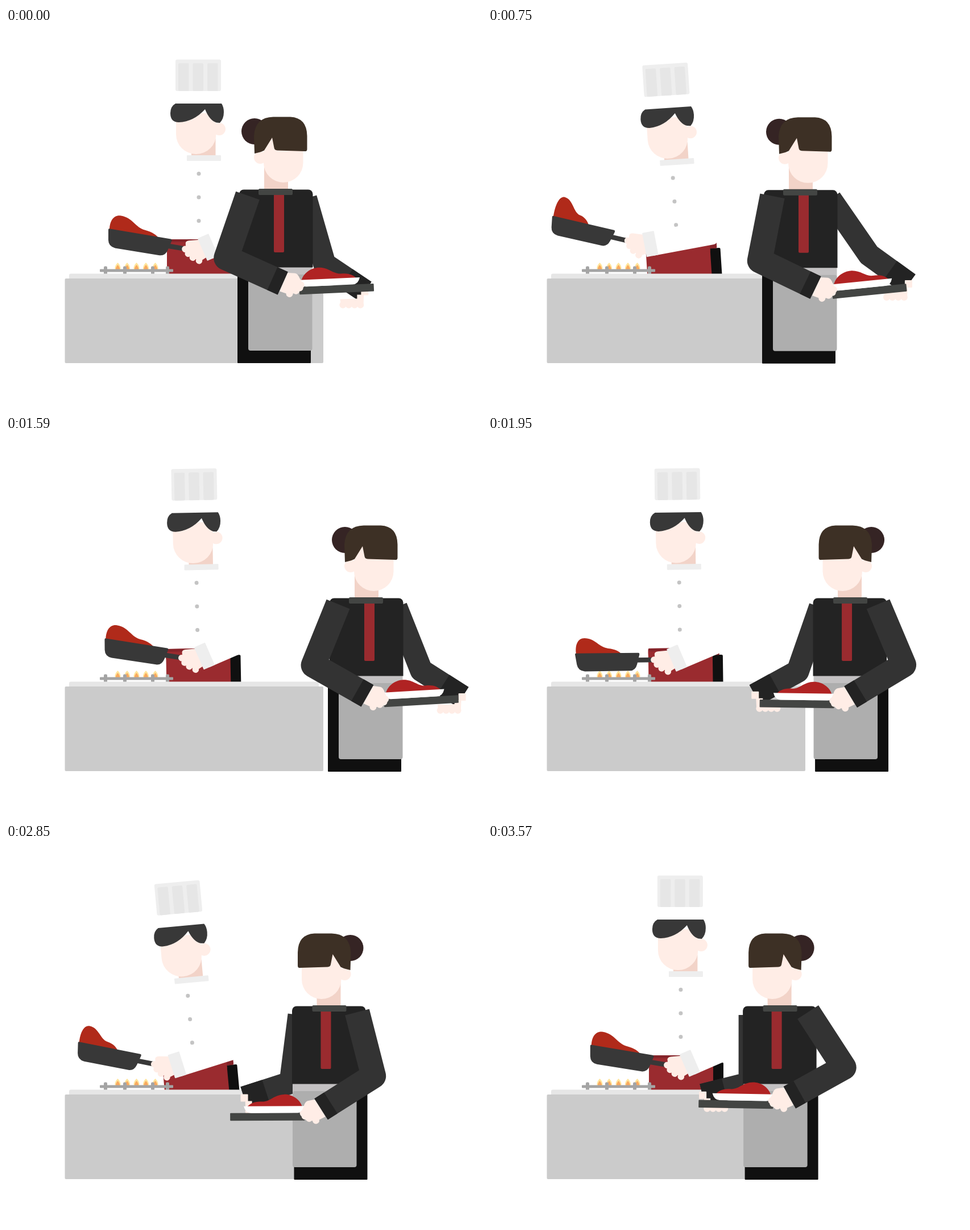
An HTML page with a canvas that plays this animation: 837 px wide and 669 px high, repeating every 3600 ms.

```html
<!DOCTYPE html>
<html lang="en">
<head>
<meta charset="utf-8">
<title>Kitchen</title>
<style>
  html, body { margin: 0; width: 837px; height: 669px; overflow: hidden; background: #fff; }
  canvas { display: block; }
</style>
</head>
<body>
<canvas id="stage" width="837" height="669"></canvas>
<script>
const ctx = document.getElementById('stage').getContext('2d');
const LOOP = 3600, STEP = 30, COOK = 1800, TURN = 1800;
const SKIN = '#ffede6', SHADE = '#f2d3c8', RED = '#9a2b2f', BLACK = '#101010',
      COAT = '#232323', SLEEVE = '#333333', IRON = '#383838';

const rad = deg => deg * Math.PI / 180;
const smooth = u => (1 - Math.cos(Math.PI * u)) / 2;

// Eases through a few [time, value] turning points
function ease(t, ...points) {
  const i = Math.max(1, points.findIndex(p => p[0] > t));
  const [t0, v0] = points[i - 1], [t1, v1] = points[i];
  return v0 + (v1 - v0) * smooth((t - t0) / (t1 - t0));
}

// Goes 0 to 1 with the given rise until the peak, then eases back to 0
const swing = (p, peak, rise) => p < peak ? rise(p / peak) : 1 - smooth((p - peak) / (COOK - peak));

function box(color, x0, y0, x1, y1, r = 0) {
  ctx.fillStyle = color;
  ctx.beginPath();
  ctx.roundRect(x0, y0, x1 - x0, y1 - y0, r);
  ctx.fill();
}
function dot(color, x, y, r) {
  ctx.fillStyle = color;
  ctx.beginPath();
  ctx.arc(x, y, r, 0, 7);
  ctx.fill();
}
function shape(color, d) {
  ctx.fillStyle = color;
  ctx.fill(new Path2D(d));
}
function at(x, y, deg, draw) {
  ctx.save();
  ctx.translate(x, y);
  ctx.rotate(rad(deg));
  draw();
  ctx.restore();
}
function line(color, width, ...pts) {
  ctx.strokeStyle = color;
  ctx.lineWidth = width;
  ctx.lineJoin = 'round';
  ctx.beginPath();
  pts.forEach(p => ctx.lineTo(p[0], p[1]));
  ctx.stroke();
}

function cookBody(lean) {
  at(446, 471, -lean, () => {
    ctx.translate(-446, -471);
    box(BLACK, 380, 384.5, 414, 470, 2);
    box(RED, 283, 372, 396, 470, 2);
    box('#85242a', 283, 372, 408, 385, 2);
    box(RED, 283, 377, 396, 390);
    box('#eeeeee', 298, 55.5, 378, 111, 3);
    for (let i = 0; i < 3; i++) box('#e6e6e6', 303 + 25.5 * i, 62, 321.5 + 25.5 * i, 111, 2);
    box(SHADE, 326, 195, 368.5, 226);
    box(SKIN, 299, 150, 369.5, 222, [0, 0, 35, 35]);
    dot(SKIN, 375, 178, 11);
    shape(IRON, 'M298 133Q289 138 289 150Q289 166 304 166Q330 165 350 143Q358 163 370 166.5L376 167Q383 160 383 148Q383 139 379 133Z');
    box('#eeeeee', 318, 224, 378, 234, 1);
    for (let i = 0; i < 3; i++) dot('#c4c4c4', 339, 256.5 + 41.5 * i, 3.5);
  });
}

function stove() {
  for (let i = 0; i < 5; i++) {
    at(196.5 + 16.5 * i, 427, 0, () => {
      shape('#ffe59c', 'M0 -14Q5 -9 5 -4Q5 1 0 1Q-5 1 -5 -4Q-5 -9 0 -14Z');
      shape('#f9a95f', 'M0 -10Q3.5 -6 3.5 -3Q3 1 0 1Q-3 1 -3.5 -3Q-3.5 -6 0 -10Z');
    });
  }
  box('#a4a4a4', 165, 424.5, 294, 429.5, 1);
  for (const x of [172, 206, 255, 281]) box('#a4a4a4', x, 419.5, x + 6, 434, 2);
  box('#e6e6e6', 111, 432.5, 550, 445, 3);
  box('#cbcbcb', 103.5, 441, 558, 590, 2);
}

function pan(foodHeight, foodWidth) {
  ctx.translate(-142, -13);
  ctx.save();
  ctx.translate(2, 2);
  ctx.scale(foodWidth, foodHeight + 2);
  shape('#b02a1a', 'M0 0C-.03 -.6 .04 -1 .18 -1C.42 -1 .5 -.42 .7 -.36C.86 -.32 .95 -.15 1 0L1 .2L0 .2Z');
  ctx.restore();
  box(IRON, 104, 8.5, 144, 17, 3);
  shape(IRON, 'M1 0L111 0Q114 0 113 4L109 20Q106 31.5 96 31.5L17 32Q5 31 3 20L0 2Q0 0 1 0Z');
}

function cookArm(p) {
  const pull = swing(p, 705, u => Math.sin(u * Math.PI / 2)), lift = pull ** 3;
  const flick = -14.2 * Math.sin(p * Math.PI / 360) * Math.exp(-p / 521);
  at(355 - 70 * pull, 386 + 18 * pull - 24 * lift, 13 * lift - 23.5, () => {
    at(-35.2, -11.4, 33.1 - 8.5 * lift + flick, () => pan(26 + 11 * lift, 88 - 24 * pull));
    box('#ffffff', 0, -21.5, 117, 21.5, [0, 0, 7, 0]);
    shape(SKIN, 'M-34 -20Q-33 -26 -26 -24L-8 -18L-8 15L-20 17L-34 6L-37 -10Z');
    for (let i = 0; i < 4; i++) dot(SKIN, -38 + 1.6 * i * i, -13 + 9.5 * i, 5.8);
    box('#eeeeee', -10.5, -21.5, 10.5, 21.5, 1);
  });
}

const reach = ([x, y], length, deg) => [x + length * Math.cos(rad(deg)), y + length * Math.sin(rad(deg))];

function arm(shoulder, elbow, wrist, width, cuff, slope) {
  line(SLEEVE, width, shoulder, elbow, wrist);
  line(COAT, width, reach(wrist, -cuff, slope), wrist);
}

function waitressBody() {
  box(BLACK, 407, 415, 536, 590, 1);
  box('#c3c1c2', 426, 418, 538.5, 440);
  box('#aeaeae', 426, 434, 538.5, 568, 4);
  dot('#352424', 437, 182, 23);
  box(SHADE, 454, 235, 496, 287);
  box(SKIN, 453, 190, 522.5, 272, [0, 0, 35, 35]);
  dot(SKIN, 447, 228, 11);
  shape('#3d3025', 'M437 221L436 190Q438 157 470 156.5L500 156.5Q529 158 529.5 190L529.5 213Q529.5 217.5 526 217L477 215.5Q472 215 471.5 211L468 193L454 215.5Q450 218 437 221Z');
  box(COAT, 410, 284.5, 539.5, 421.5, [8, 8, 0, 0]);
  box(RED, 471, 290, 489, 395, 2);
  box('#434543', 444, 283, 504, 294, 2);
}

function tray() {
  box('#434543', 0, 0, 131, 13.5, 1);
  shape('#b02323', 'M4 -10C8 -25 24 -33 36 -32.5C54 -32 60 -20 74 -20C88 -21 96 -17 102 -10Z');
  shape('#ffffff', 'M0 -12L107 -12Q104 0 94 0L12 0Q2 -1 0 -12Z');
}

function farHand() {
  box(SKIN, -7, -6, 6, 7, 1);
  shape(SKIN, 'M-14 6L-2 6L-3 26L-42 26L-44 14L-14 13Z');
  for (let i = 0; i < 4; i++) dot(SKIN, -39 + 10.3 * i, 24, 6);
}

function nearHand() {
  shape(SKIN, 'M-6 14L9 -18L22 -17Q27 -16 30 -8L36 3L28 17L10 20Z');
  for (let i = 0; i < 4; i++) dot(SKIN, 32 - 2.3 * i * i, 4 + 5 * i, 6);
}

function waitress(t) {
  const nearSwing = ease(t, [0, 19], [700, 11], [1850, 23.5], [2550, 10], [LOOP, 33]);
  const nearSlope = ease(t, [0, 24.2], [2700, 32.6], [LOOP, 29]);
  const farSwing = ease(t, [0, 16], [900, 36], [TURN, 19.5], [LOOP, 0]);
  const farSlope = ease(t, [0, 34], [900, 36], [LOOP, 14]);
  const tilt = ease(t, [0, -2.6], [950, -6.2], [2400, 0.8], [LOOP, -1]);

  const nearShoulder = [425, 295], farShoulder = [527, 300];
  const nearElbow = reach(nearShoulder, 116, 90 + nearSwing);
  const nearWrist = reach(nearElbow, 109, nearSlope);
  const farElbow = reach(farShoulder, 120, 90 - farSwing);
  const farWrist = reach(farElbow, 86, farSlope);

  ctx.save();
  ctx.translate(0, Math.min(1, t / 900));
  if (t < TURN) {
    ctx.translate(t * 0.1, 0);
  } else {
    ctx.translate(1122.5 - (t - TURN) * 0.0762, 0);
    ctx.scale(-1, 1);
  }
  arm(farShoulder, farElbow, farWrist, 40, 40, farSlope);
  at(...farWrist, 0, farHand);
  waitressBody();
  at(nearWrist[0] + 29, nearWrist[1] + 6.5, tilt, tray);
  at(...nearWrist, nearSlope - 26, nearHand);
  arm(nearShoulder, nearElbow, nearWrist, 44, 20, nearSlope);
  ctx.restore();
}

function render(t) {
  const p = t % COOK;
  ctx.fillStyle = '#fff';
  ctx.fillRect(0, 0, 837, 669);
  cookBody(5.4 * swing(p, 1080, u => u));
  stove();
  cookArm(p);
  waitress(t);
}

function tick() {
  render(Math.floor(performance.now() % LOOP / STEP) * STEP);
  requestAnimationFrame(tick);
}
tick();
</script>
</body>
</html>
```
